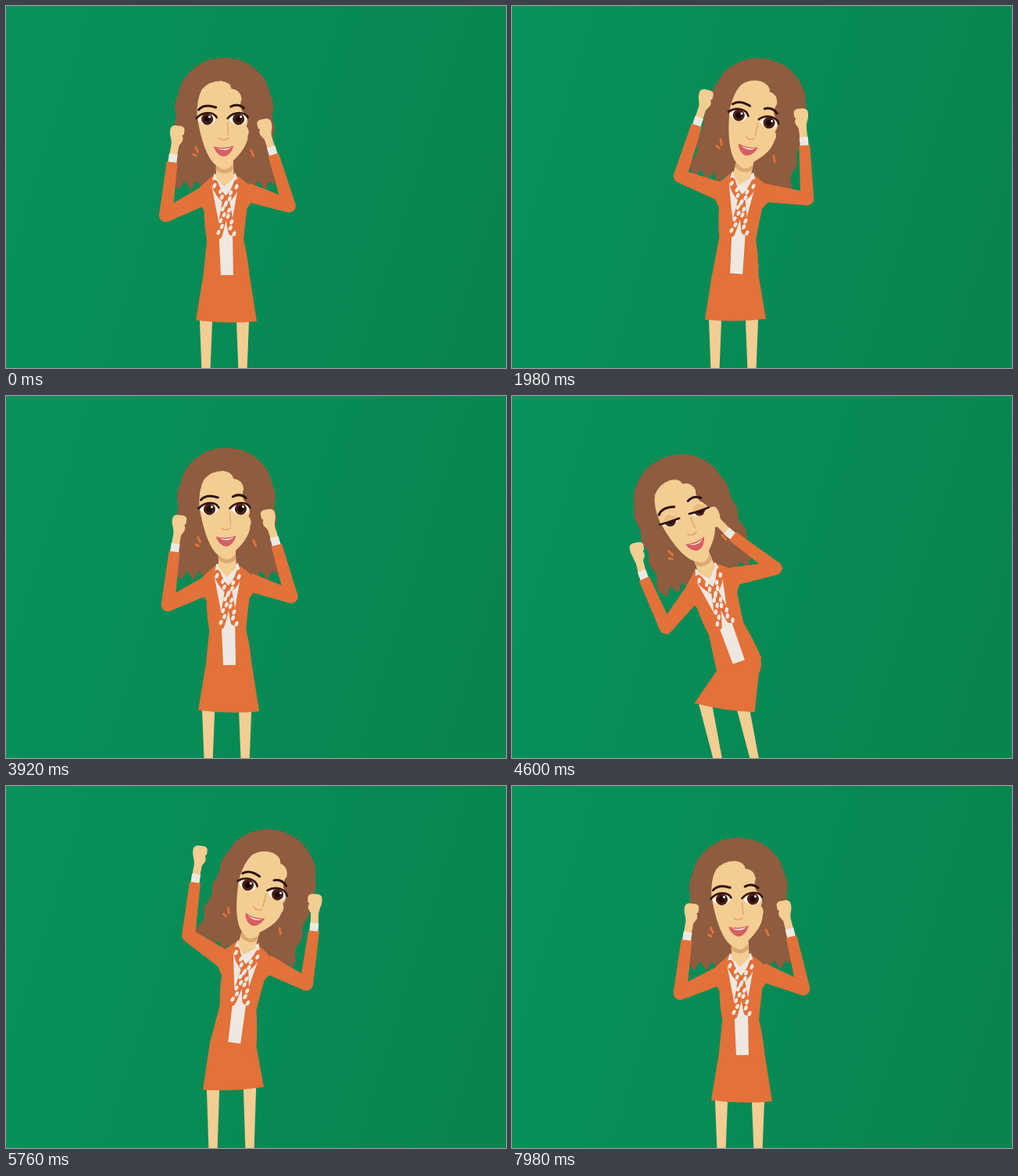
These frames come from a looping animation (640x464 px, 8 s). An HTML page with a canvas:

```html
<!DOCTYPE html>
<html lang="en">
<head>
<meta charset="utf-8">
<title>Dancing woman</title>
<style>
  html, body { margin: 0; width: 100%; height: 100%; overflow: hidden; background: #088c55; }
  canvas { display: block; width: 640px; height: 464px; }
</style>
</head>
<body>
<canvas id="stage" width="640" height="464"></canvas>
<script>
const ctx = document.getElementById('stage').getContext('2d');
const LOOP = 8000, CYCLE = 81;
const SKIN = '#f4cd93', SHADE = '#dcaa70', HAIR = '#8e5c3f', SUIT = '#e2713a',
      CREAM = '#eee8e0', DARK = '#2e1410';
const TORSO = 135, SKIRT = 57, UPPER_ARM = 57, FOREARM = 73, HAND = 28;

// Angles are in degrees. `up` opens an arm away from the body, `fore` bends it inwards.
const ready = { x: 294, y: 347, lean: -1, tilt: -1, upL: 66, foreL: 7, upR: 68, foreR: 13 };
const rest  = { ...ready, x: 282, tilt: 0, upL: 63, upR: 72, foreR: 17 };
const level = { ...ready, x: 288, y: 345, lean: 0, tilt: 0, upL: 74, foreL: 13, upR: 72 };
const dip   = { ...ready, x: 293, lean: -2.5, tilt: -8, upL: 56, foreL: 2, upR: 55, foreR: 4 };
const duck  = { x: 290, y: 343, lean: -19, tilt: -20, upL: 38, foreL: -24, upR: 101, foreR: 53 };
const sway  = { x: 286, y: 345, lean: 4, tilt: 14, upL: 111, foreL: 18, upR: 82, foreR: 3 };
const reach = { x: 291, y: 331, lean: 8, tilt: 18, upL: 124, foreL: 7, upR: 63, foreR: -8 };

const dance = [[sway, level], [reach, dip], [sway, level]].flatMap(([high, low], n) =>
  [[1, rest], [10, ready], [18, duck], [44, high], [69, low]]
    .map(([step, pose]) => [step + n * CYCLE, pose]));

const rad = degrees => degrees * Math.PI / 180;
const mix = (a, b, k) => [a[0] + (b[0] - a[0]) * k, a[1] + (b[1] - a[1]) * k];

// Moves x, y in a frame turned by `degrees` and returns the stage point.
function offset([px, py], degrees, x, y) {
  const c = Math.cos(rad(degrees)), s = Math.sin(rad(degrees));
  return [px + x * c - y * s, py + x * s + y * c];
}

function polygon(points) {
  const path = new Path2D();
  points.forEach(p => path.lineTo(...p));
  return path;
}

function hairShape() {
  const right = [], left = [], fringe = [];
  for (let y = -146; y <= 18; y += 2) {
    const u = (y + 146) / 164;
    const crown = 1 - Math.min(1, u / 0.45);
    const width = 61 * Math.sqrt(1 - crown ** 2.4) + u * (3 + 2.5 * Math.sin(y / 5));
    right.push([width, y]);
    left.unshift([-width - 1, y]);
  }
  for (let x = 64; x >= -64; x -= 2) fringe.push([x, 18 + 5 * Math.sin(x / 2.5)]);
  return polygon([...right, ...fringe, ...left]);
}

const shape = d => new Path2D(d);
const parts = {
  hair: hairShape(),
  face: shape('M-29-105Q-20-116-4-116Q8-114 9-106Q20-105 22-93Q19-86 22-78Q33-68 28-58Q33-52 30-46Q30-28 0-4Q-24-4-35-70Q-36-92-29-105Z'),
  neck: shape('M-10-18L-11 8L0 20L12 8L11-18Z'),
  chin: shape('M-11-10Q0 5 11-10V-2Q0 7-11-2Z'),
  brows: shape('M-33-79Q-26-87-11-82M8-83Q17-88 25-81'),
  nose: shape('M4-62L5-47M-7-43Q-1-38 5-43'),
  lips: shape('M-14-32Q-1-28 12-33Q8-20-1-19Q-10-20-14-32Z'),
  teeth: shape('M-10-30Q0-27 9-31Q1-24-10-30Z'),
  earrings: shape('M-37-31L-34-25M-40-22L-36-20M34-27L37-20'),
  eye: shape('M-12 0Q-8-8 1-8Q10-7 11 0Q8 6 0 7Q-8 6-12 0Z'),
  jacket: shape('M-14 4L-32 20L-35 36L-27 50Q-27 70-24 88Q-27 112-30 138H30Q28 110 23 88Q25 68 28 48L38 34L36 21L14 4Z'),
  shirt: shape('M-13 2L-17 16L-9 62L-7 133H9V62L18 16L14 2L0 14Z'),
  scarf: shape('M-13 15Q-8 30 1 37Q-2 60-9 82M16 15Q11 30 1 37Q5 60 8 78'),
  fist: shape('M-5 10L-7 2Q-10-4-9-11Q-7-16 0-15Q8-16 9-11V-5L7-3Q10 2 7 6L4 11Z')
};

function fill(path, color) {
  ctx.fillStyle = color;
  ctx.fill(path);
}

function stroke(path, color, width, cap = 'round') {
  ctx.strokeStyle = color;
  ctx.lineWidth = width;
  ctx.lineCap = cap;
  ctx.stroke(path);
}

function dot(x, y, rx, ry, color) {
  ctx.fillStyle = color;
  ctx.beginPath();
  ctx.ellipse(x, y, rx, ry, 0.4, 0, 7);
  ctx.fill();
}

function at([x, y], degrees, draw) {
  ctx.save();
  ctx.translate(x, y);
  ctx.rotate(rad(degrees));
  draw();
  ctx.restore();
}

function taper(a, b, wideA, wideB, color) {
  const angle = Math.atan2(b[1] - a[1], b[0] - a[0]) * 180 / Math.PI;
  fill(polygon([
    offset(a, angle, 0, wideA / 2), offset(b, angle, 0, wideB / 2),
    offset(b, angle, 0, -wideB / 2), offset(a, angle, 0, -wideA / 2)
  ]), color);
}

function drawEye(x, lid) {
  at([x, -66], 0, () => {
    ctx.save();
    ctx.clip(parts.eye);
    fill(parts.eye, '#fff8f0');
    dot(0, -1, 7.5, 7.5, '#4a1f16');
    dot(0, -1, 4, 4, '#1c0a08');
    dot(3, -4, 1.5, 1.5, '#fff8f0');
    ctx.fillStyle = '#ecbd82';
    ctx.fillRect(-14, -12, 28, 12 * lid);
    ctx.restore();
    const top = -9 + lid * 9;
    stroke(shape(`M-14 ${-2 + lid}Q-8 ${top} 1 ${top}Q9 ${top} 12 ${-3 + lid * 3}`), DARK, 2.6);
  });
}

function drawFace(tilt) {
  const lid = Math.min(1, Math.max(0, (-tilt - 12) / 8));
  fill(parts.neck, SKIN);
  fill(parts.chin, SHADE);
  fill(parts.face, SKIN);
  stroke(parts.earrings, SUIT, 3);
  stroke(parts.brows, DARK, 3);
  stroke(parts.nose, SHADE, 1.6);
  drawEye(-22, lid);
  drawEye(18, lid);
  fill(parts.lips, '#d65f62');
  fill(parts.teeth, '#fff8f0');
}

function drawTorso() {
  fill(parts.jacket, SUIT);
  fill(parts.shirt, CREAM);
  stroke(parts.scarf, SUIT, 9);
  for (let i = 0; i < 9; i++) {
    const y = 18 + i * 7.5, spread = Math.abs(y - 38) * (y < 38 ? 0.6 : 0.2) + 2;
    dot(1 - spread + i % 2 * 3, y, 2.2, 3.5, CREAM);
    dot(1 + spread - i % 2 * 3, y + 2, 2.2, 3.5, CREAM);
  }
}

function drawSkirt(hip, lean) {
  const bend = Math.max(0, -lean - 4) * 1.2;
  const hem = [hip[0] - bend, hip[1] + SKIRT];
  for (const dx of [-26, 21]) {
    taper([hem[0] + dx, hem[1] - 12], [hip[0] + dx, 468], 17, 11, SKIN);
  }
  dot(...hip, 29, 29, SUIT);
  const path = polygon([
    offset(hip, lean, 30, 0), offset(hip, lean, -30, 0), offset(hem, -lean * 0.4, -39, -1)
  ]);
  path.quadraticCurveTo(hem[0], hem[1] + 4, ...offset(hem, -lean * 0.4, 39, 0));
  fill(path, SUIT);
}

function drawArm(shoulder, up, fore, side) {
  const elbow = offset(shoulder, -side * up, 0, UPPER_ARM);
  const wrist = offset(elbow, -side * fore, 0, -FOREARM);
  const bend = -side * (fore * 0.75 + 5);
  const fist = offset(wrist, bend, 0, -HAND);
  stroke(polygon([wrist, fist]), SKIN, 10);
  at(fist, bend * 0.7, () => {
    ctx.scale(-side, 1);
    fill(parts.fist, SKIN);
  });
  stroke(polygon([mix(wrist, elbow, 0.1), mix(wrist, fist, 0.22)]), CREAM, 11, 'butt');
  taper(shoulder, elbow, 24, 17, SUIT);
  taper(elbow, mix(wrist, elbow, 0.06), 17, 14, SUIT);
  dot(...elbow, 8.5, 8.5, SUIT);
}

function poseAt(step) {
  const next = dance.findIndex(([s]) => s > step);
  const [from, a] = dance[next - 1], [to, b] = dance[next];
  const u = (step - from) / (to - from), k = u * u * (3 - 2 * u);
  return Object.fromEntries(Object.keys(a).map(key => [key, a[key] + (b[key] - a[key]) * k]));
}

function drawWoman({ x, y, lean, tilt, upL, foreL, upR, foreR }) {
  const hip = [x, y], neck = offset(hip, lean, 0, -TORSO);
  at(neck, tilt, () => fill(parts.hair, HAIR));
  drawSkirt(hip, lean);
  at(neck, lean, drawTorso);
  at(neck, tilt, () => drawFace(tilt));
  drawArm(offset(neck, lean, -25, 30), upL, foreL, -1);
  drawArm(offset(neck, lean, 28, 27), upR, foreR, 1);
}

const backdrop = ctx.createLinearGradient(0, 0, 640, 200);
backdrop.addColorStop(0, '#08925c');
backdrop.addColorStop(1, '#08854f');

// The picture advances in groups of three: two short steps and a long one.
function stepAt(ms) {
  const t = ms + 20;
  return 3 * Math.floor(t / 140) + Math.min(2, Math.floor(t % 140 / 20));
}

const start = performance.now();
function render() {
  const ms = Math.max(0, performance.now() - start) % LOOP;
  ctx.fillStyle = backdrop;
  ctx.fillRect(0, 0, 640, 464);
  drawWoman(poseAt(stepAt(ms)));
  requestAnimationFrame(render);
}
render();
</script>
</body>
</html>
```
